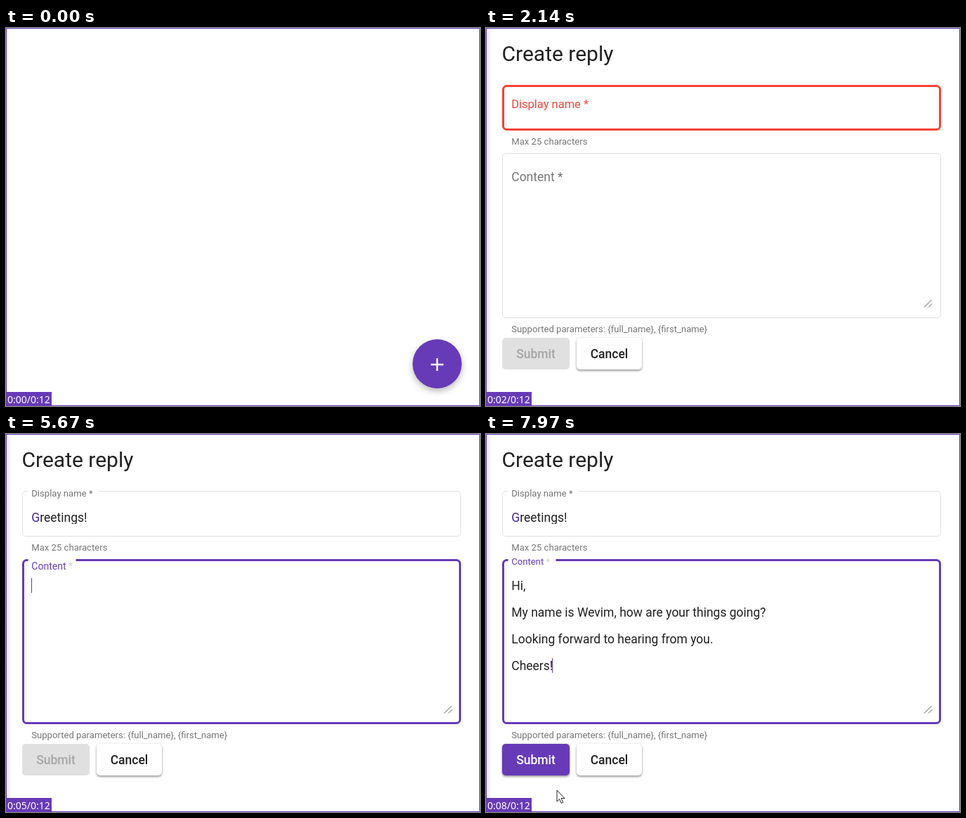
Write an HTML page that moves like this. It is 675x538 px and loops after 8 s.

```html
<!DOCTYPE html>
<html lang="en">
<head>
<meta charset="utf-8">
<style>
  html, body { margin: 0; height: 100%; overflow: hidden; background: #fff; }
  svg { display: block; }
  text { font: 17.5px Roboto, sans-serif; fill: #212121; white-space: pre; }
  .title { font-size: 30px; }
  .hint { font-size: 13.125px; fill: #757575; }
  .button { font-weight: 500; text-anchor: middle; }
  .raised { filter: drop-shadow(0 2px 1.5px #0005) drop-shadow(0 0 1.5px #0002); }
  .cursor { fill: #fff; stroke: #222; stroke-linejoin: round; }
  #clock { font: 14px "Noto Sans", "Open Sans", sans-serif; fill: #fff; }
</style>
</head>
<body>
<svg width="675" height="538">
  <defs>
    <linearGradient id="edge"><stop stop-color="#ececec"/><stop offset="1" stop-color="#fff"/></linearGradient>
    <clipPath id="inputClip"><path d="M23 105H648V128H23z"/></clipPath>
  </defs>

  <g id="fab">
    <circle cx="614" cy="478" r="35" fill="#673ab7"/>
    <path d="M605 479h18M614 470v18" stroke="#fff" stroke-width="2.5"/>
  </g>

  <g id="panel">
    <path d="M0 0H675V538H0z" fill="#fff"/>
    <path d="M0 0H9V538H0z" fill="url(#edge)"/>
    <text class="title" x="22.5" y="47">Create reply</text>

    <rect id="nameBox" rx="5"/>
    <path id="nameGap" d="M31.5 79h100v7h-100z" fill="#fff"/>
    <text id="nameLabel" x="36.25">Display name<tspan> *</tspan></text>
    <g clip-path="url(#inputClip)">
      <text id="placeholder" x="36.25" y="125" style="fill:#a3a3a3">Ex. Greetings</text>
      <text x="36.25" y="125"><tspan id="initial" fill="#4a2a94"></tspan><tspan id="rest"></tspan></text>
    </g>
    <text class="hint" x="36.25" y="166">Max 25 characters</text>

    <rect id="contentBox" rx="5"/>
    <path id="contentGap" d="M31.5 176h68v7h-68z" fill="#fff"/>
    <text id="contentLabel" x="36.25">Content<tspan> *</tspan></text>
    <g id="message">
      <text x="36.25" y="222">Hi,</text>
      <text x="36.25" y="260">My name is Wevim, how are your things going?</text>
      <text x="36.25" y="298">Looking forward to hearing from you.</text>
      <text x="36.25" y="336">Cheers!</text>
    </g>
    <path d="M624 397.500l10.500-10.500M630 397.500l5-5" stroke="#555"/>
    <text class="hint" x="36.25" y="433">Supported parameters: {full_name}, {first_name}</text>

    <rect id="submit" x="23" y="441" width="96" height="45" rx="5"/>
    <text id="submitText" class="button" x="71" y="470">Submit</text>
    <rect class="raised" x="129" y="441" width="93" height="45" rx="5" fill="#fff"/>
    <text class="button" x="175.500" y="470">Cancel</text>
    <path id="caret"/>
  </g>

  <path d="M.5 .5H674.5V537.5H.5z" fill="none" stroke="#673ab7"/>
  <path d="M0 518H65V538H0z" fill="#673ab7"/>
  <text id="clock" x="2" y="534"></text>
  <path id="arrow" class="cursor" d="M0 0v16l3.600-3.400 2.600 5.800 2.500-1-2.500-5.800h4.800z"/>
  <path id="hand" class="cursor" d="M-2 2a2 2 0 0 1 4 0v7l6 1.500q2 .5 2 3l-1 5-1 4.500h-8l-6-9q0-2 2-1.500l2 2zM2 9v4M5 10v3M8 11v2"/>
</svg>

<script>
const LOOP = 8000;
const PURPLE = '#673ab7', RED = '#f44336', GREY = '#757575';
const OPEN = 1620, NAME_FOCUS = 2440, TYPE = 3540, CONTENT_FOCUS = 5510, PASTE = 6470;
const WORD = 'Greetings!';
const keyTimes = [TYPE, 3740, 3950, 4110, 4310, 4430, 4580, 4660, 4740, 5050];
const seconds = [960, 1950, 2970, 3950, 4740, 5960, 6980, 7930];
const caretSpans = [[NAME_FOCUS, 2970], [3460, 6040], [PASTE, 6980], [7500, LOOP]];

const $ = id => document.getElementById(id);
const set = (id, attrs) => { for (const k in attrs) $(id).setAttribute(k, attrs[k]); };
const show = (id, on) => { $(id).style.display = on ? '' : 'none'; };
const progress = (t, start, length) => Math.min(1, Math.max(0, (t - start) / length));
const easeOut = p => 1 - (1 - p) ** 3;
const easeInOut = p => p * p * (3 - 2 * p);
const lerp = (a, b, p) => a + (b - a) * p;
const mix = (a, b, p) => `color-mix(in srgb, ${b} ${p * 100}%, ${a})`;
const countPast = (times, t) => times.filter(x => t >= x).length;

function drawField(id, top, height, float, focused, color, starColor) {
  const w = focused ? 3 : 1;
  set(id + 'Box', {
    x: 23 + w / 2, y: top + w / 2, width: 625 - w, height: height - w,
    fill: 'none', stroke: focused ? color : '#e0e0e0', 'stroke-width': w
  });
  const label = $(id + 'Label');
  label.setAttribute('y', top + lerp(40, 8, float));
  label.style.fontSize = lerp(17.5, 13.125, float) + 'px';
  label.style.fill = focused ? mix(GREY, color, float < .3 && color !== RED ? float : Math.max(float, .9)) : GREY;
  label.lastChild.style.fill = starColor;
  show(id + 'Gap', float > .3);
}

function drawCaret(t, typed) {
  show('caret', caretSpans.some(([from, to]) => t >= from && t < to));
  let x = 36.5, y = 109, color = t < TYPE ? RED : '#444';
  if (t >= PASTE) {
    x = 94.5; y = 319;
    color = t < 7500 ? '#555' : PURPLE;
  } else if (t >= CONTENT_FOCUS) {
    y = 205; color = PURPLE;
  } else if (typed) {
    x = Math.floor(36 + $('initial').parentNode.getComputedTextLength()) - .5;
  }
  set('caret', { d: `M${x} ${y}v${y === 109 ? 19 : 21}`, stroke: color });
}

function drawCursor(t) {
  const enter = easeOut(progress(t, 240, 250)), settle = easeInOut(progress(t, 770, 190));
  const x = lerp(lerp(650, 609, enter), 600, settle);
  const y = lerp(lerp(538, 475, enter), 491, settle);
  const overFab = Math.hypot(x - 614, y - 478) < 35;
  const early = t >= 240 && t < 2140, late = t >= 7900;
  show('hand', early && overFab);
  show('arrow', late || early && !overFab);
  set('hand', { transform: `translate(${x} ${y})` });
  const leave = easeOut(progress(t, 7900, 70));
  set('arrow', { transform: late
    ? `translate(${lerp(118, 101, leave)} ${lerp(536, 507, leave)})`
    : `translate(${x} ${y})` });
}

function draw(t) {
  const open = easeInOut(progress(t, OPEN, 380));
  set('panel', { transform: `translate(${675 * (1 - open)} 0)`, opacity: open });
  $('fab').style.filter = t < OPEN
    ? 'drop-shadow(0 4px 5px #0004)'
    : 'drop-shadow(0 7px 10px #0004)';

  const typed = countPast(keyTimes, t);
  $('initial').textContent = WORD.slice(0, Math.min(1, typed));
  $('rest').textContent = WORD.slice(1, Math.max(1, typed));
  show('placeholder', t >= NAME_FOCUS && !typed);

  const nameFloat = lerp(.23, 1, easeOut(progress(t, NAME_FOCUS, 400)));
  const inName = t < CONTENT_FOCUS;
  drawField('name', 81, 65, nameFloat, inName, typed ? PURPLE : RED,
    !typed ? RED : inName ? '#ddd8e6' : GREY);
  const contentFloat = easeOut(progress(t, CONTENT_FOCUS, 400));
  drawField('content', 178, 235, contentFloat, !inName, PURPLE, inName ? GREY : '#d0cbd8');

  const enabled = easeOut(progress(t, PASTE, 260));
  show('message', t >= PASTE);
  $('submit').style.fill = mix('#e0e0e0', PURPLE, enabled);
  $('submit').setAttribute('class', enabled ? 'raised' : '');
  $('submitText').style.fill = mix('#a6a6a6', '#fff', enabled);

  drawCaret(t, typed);
  drawCursor(t);
  $('clock').textContent = `0:0${countPast(seconds, t)}/0:12`;
}

const start = performance.now();
function tick() {
  draw((performance.now() - start) % LOOP);
  requestAnimationFrame(tick);
}
tick();
</script>
</body>
</html>
```
